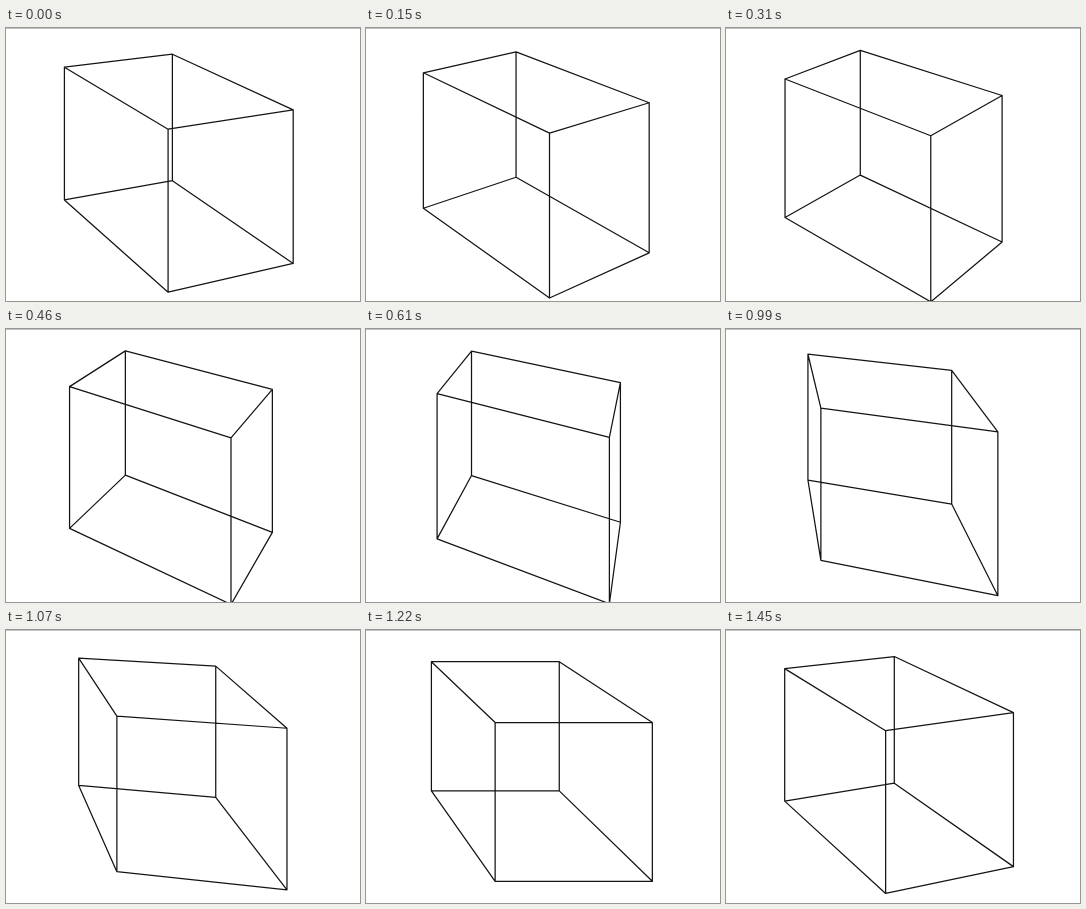
Animation of 354x273 px, one loop 1530 ms. Source, as an HTML page:

```html
<!DOCTYPE html>
<html lang="en">
<head>
<meta charset="utf-8">
<title>Turning wire cube</title>
<style>
html, body { margin: 0; width: 100%; height: 100%; overflow: hidden; background: #fff; }
svg { display: block; width: 100vw; height: 100vh; }
</style>
</head>
<body>
<svg viewBox="0 0 354 273">
  <rect width="354" height="273" fill="#fff"/>
  <rect width="354" height="1" fill="#c3c3c3"/>
  <path id="wire" fill="none" stroke="#141414" stroke-width="1.25" stroke-linejoin="round" stroke-linecap="round"/>
</svg>
<script>
(() => {
  const wire = document.getElementById('wire');

  // Hold time of each step, in ms
  const holds = [70, 80, 80, 80, 70, 80, 70, 80, 80, 80, 70, 80, 80, 70, 80, 70, 80, 80, 70, 80];
  const loop = holds.reduce((a, b) => a + b);
  const startDeg = -29.9, stepDeg = 4.68;

  // Vanishing point, then the cube in screen pixels at its axis depth
  const vx = -212.5, vy = -233.4;
  const axis = 377, radius = 99.7, roof = 292.4, floor = 434.8;
  const depth = 0.1456; // radius relative to the axis depth

  function stepAt(t) {
    let i = 0;
    while (t >= holds[i]) t -= holds[i++];
    return i;
  }

  function project(angle, height) {
    const d = 1 - depth * Math.cos(angle);
    const x = vx + (axis + radius * Math.sin(angle)) / d;
    const y = vy + height / d;
    return x.toFixed(2) + ' ' + y.toFixed(2);
  }

  function draw(step) {
    const turn = (startDeg + stepDeg * step) * Math.PI / 180;
    const ring = h => [0, 1, 2, 3].map(k => project(turn + k * Math.PI / 2, h));
    const upper = ring(roof), lower = ring(floor);
    const face = pts => 'M' + pts.join('L') + 'Z';
    const posts = upper.map((p, k) => 'M' + p + 'L' + lower[k]).join('');
    wire.setAttribute('d', face(upper) + face(lower) + posts);
  }

  const begin = performance.now();
  function tick() {
    draw(stepAt((performance.now() - begin) % loop));
    requestAnimationFrame(tick);
  }
  tick();
})();
</script>
</body>
</html>
```
